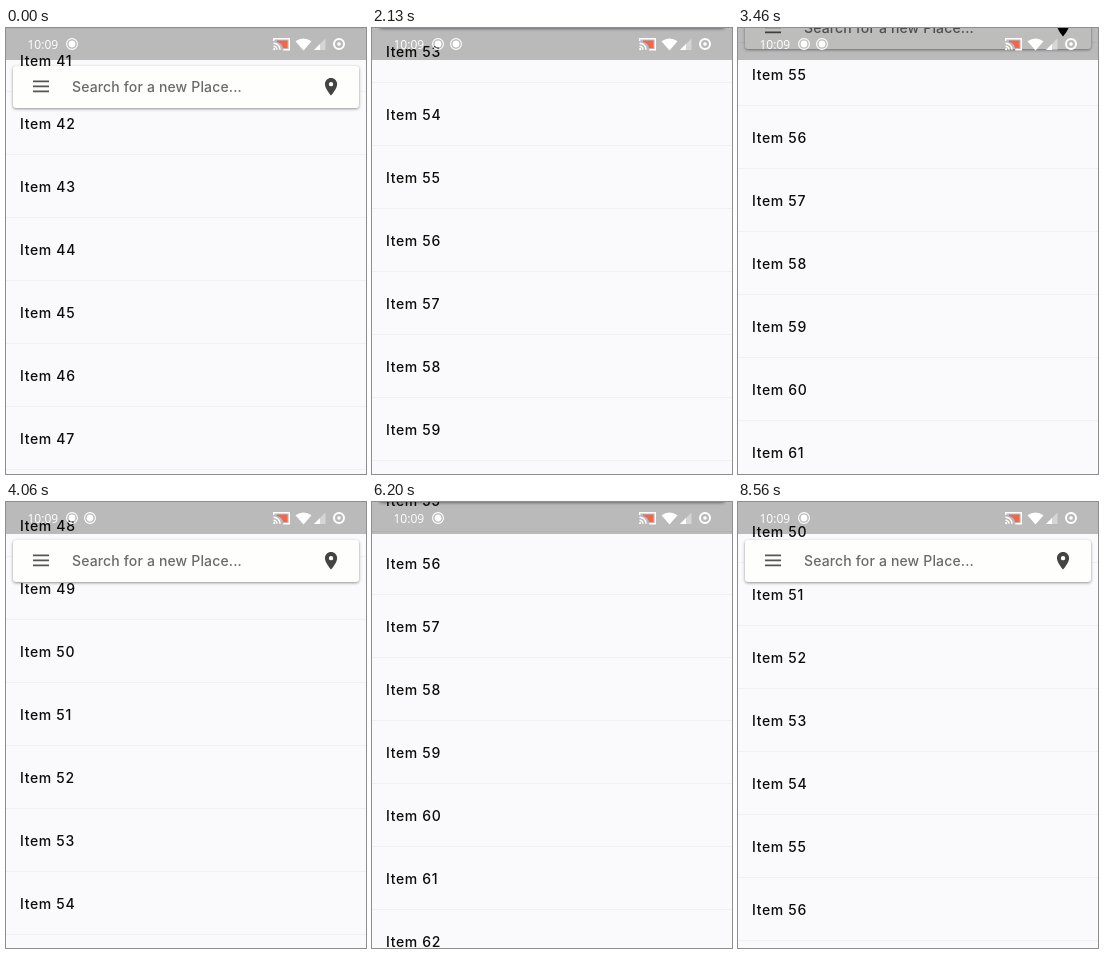
These frames come from a looping animation (360 by 446 pixels, 8.6 s). An HTML page:

```html
<!DOCTYPE html>
<html lang="en">
<head>
<meta charset="utf-8">
<title>Floating search bar</title>
<style>
  html, body { margin: 0; width: 100%; height: 100%; overflow: hidden; }
  #stage { position: relative; width: 360px; height: 446px; overflow: hidden; background: #fafafc;
    font: 500 14px/63px Inter, sans-serif; }
  #list, #bar, #status { position: absolute; left: 0; top: 0; }
  .item { width: 346px; height: 62px; padding-left: 14px; border-bottom: 1px solid #f0f0f2;
    color: #0c0c0c; letter-spacing: .65px; white-space: pre; }
  #bar { left: 7px; top: 38px; width: 346px; height: 42px; border-radius: 3px; background: #fefefd;
    box-shadow: 0 1px 3px rgba(0, 0, 0, .42); }
  #bar span { position: absolute; left: 59px; top: 0; line-height: 41px; color: #6a6a6a;
    letter-spacing: .15px; white-space: pre; }
  #bar svg { position: absolute; left: 0; top: 0; }
  #status { width: 360px; height: 32px; background: rgba(0, 0, 0, .26); }
  #status text { font: 12px "Open Sans", sans-serif; }
</style>
</head>
<body>
<div id="stage">
  <div id="list"></div>
  <div id="bar">
    <svg width="346" height="42">
      <path d="M20 15.3h16M20 20.3h16M20 25.3h16" stroke="#555" stroke-width="1.8"/>
      <path id="pin" transform="translate(307.6 10.3) scale(.87)" fill-rule="evenodd"
        d="M12 2C8.13 2 5 5.13 5 9c0 5.25 7 13 7 13s7-7.75 7-13c0-3.87-3.13-7-7-7zm0 9.5a2.5 2.5 0 0 1 0-5 2.5 2.5 0 0 1 0 5z"/>
    </svg>
    <span>Search for a new Place...</span>
  </div>
  <svg id="status" width="360" height="32" fill="#fff">
    <defs>
      <g id="rec">
        <circle r="5.4" fill="none" stroke="#fff" stroke-width="1.1"/>
        <circle r="3.4"/>
      </g>
    </defs>
    <text x="21.5" y="20.5">10:09</text>
    <use href="#rec" x="66" y="16"/>
    <use href="#rec" x="84" y="16" id="rec2"/>
    <g fill="none" stroke="#fff" stroke-width="1.4">
      <path d="M271 12.5h10.5v7.5h-4.5q-1-5-6-6z" fill="#f0684c" stroke="none"/>
      <path d="M267.7 13v-2.3h15.6v11h-6M267.5 15.2a6.5 6.5 0 0 1 6.5 6.5M267.5 18.2a3.5 3.5 0 0 1 3.5 3.5"/>
    </g>
    <circle cx="268.2" cy="21.2" r="1.1"/>
    <path d="M289.5 13.3q8-5.8 16 0L297.5 22.5z"/>
    <path d="M319.5 10.5v11.5h-11.5z" opacity=".4"/>
    <path d="M314 16v6h-6z"/>
    <circle cx="333" cy="16" r="5" fill="none" stroke="#fff" stroke-width="2"/>
    <circle cx="333" cy="16" r="1.8"/>
  </svg>
</div>
<script>
  const LOOP = 8600, ROW = 63, FIRST = 40, LAST = 64, HIDE = 80;
  const $ = id => document.getElementById(id);
  const list = $('list'), bar = $('bar'), pin = $('pin'), rec2 = $('rec2');

  for (let n = FIRST; n <= LAST; n++) {
    const item = document.createElement('div');
    item.className = 'item';
    item.textContent = 'Item ' + n;
    list.append(item);
  }

  const drag = p => x => x ** p;
  const fling = k => x => (1 - Math.exp(-k * x)) / (1 - Math.exp(-k));

  // [end time, scroll position, easing towards it]
  const moves = [
    [0, 2551.2],
    [400, 2550.5, fling(2)],
    [960, 2550.5, drag(1)],
    [1740, 2690, drag(4.4)],
    [3050, 3440, fling(6)],
    [3260, 3440, drag(1)],
    [3570, 3390, drag(2)],
    [5060, 2947, fling(6.36)],
    [5200, 2947, drag(1)],
    [5300, 2981, drag(2)],
    [6500, 3469, fling(7.2)],
    [6800, 3469, drag(1)],
    [6830, 3469.5, drag(1)],
    [7030, 3469.5, drag(1)],
    [7250, 3420, drag(2)],
    [8560, 3121, fling(6.3)],
    [LOOP, 3121, drag(1)]
  ];

  // [start time, scroll position at the turn, direction]
  const turns = [[0, 9999, -1], [960, 2550.5, 1], [3260, 3440, -1], [5200, 2947, 1], [7030, 3469.5, -1]];

  function scrollAt(t) {
    const i = moves.findIndex((m, j) => j && t < m[0]);
    const [t0, s0] = moves[i - 1], [t1, s1, ease] = moves[i];
    return s0 + (s1 - s0) * ease((t - t0) / (t1 - t0));
  }

  function barShift(t, s) {
    const [, from, dir] = turns.findLast(turn => t >= turn[0]);
    return dir > 0 ? Math.min(HIDE, s - from) : Math.max(0, HIDE - (from - s));
  }

  function draw() {
    const t = performance.now() % LOOP, s = scrollAt(t), shift = Math.round(barShift(t, s));
    list.style.transform = `translateY(${Math.round(FIRST * ROW - s) - 31}px)`;
    bar.style.transform = `translateY(${-shift}px)`;
    pin.setAttribute('fill', shift ? '#000' : '#444');
    rec2.setAttribute('visibility', t > 215 && t < 5000 ? 'visible' : 'hidden');
    requestAnimationFrame(draw);
  }
  draw();
</script>
</body>
</html>
```
